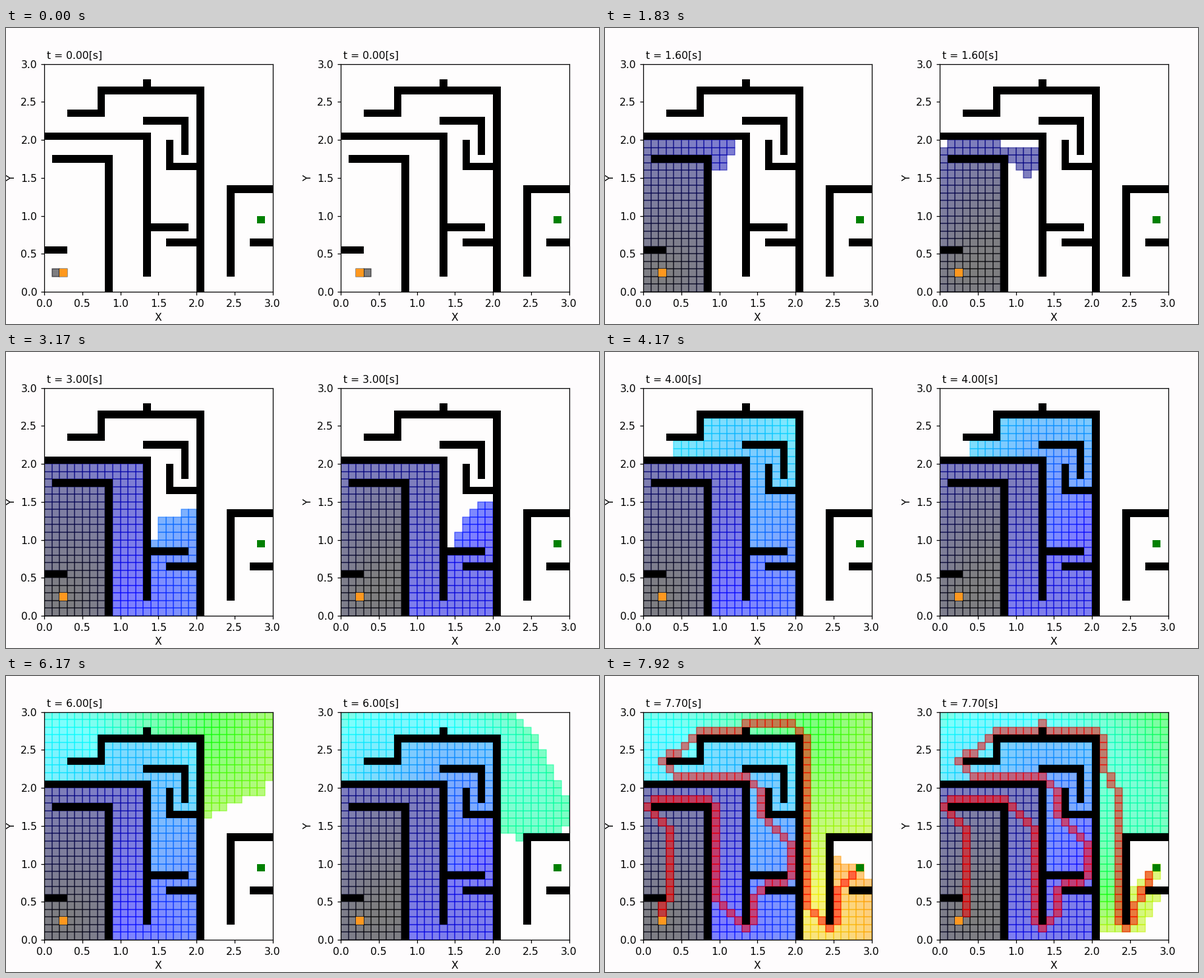
Write a matplotlib script that moves like this. It is 900 px wide and 450 px high and loops after 8000 ms.

```python
import math

import numpy as np
import matplotlib.pyplot as plt
from matplotlib.animation import FuncAnimation
from matplotlib.collections import PolyCollection
from matplotlib.colors import to_rgb
from matplotlib.patches import Rectangle

plt.rcParams["font.family"] = "DejaVu Sans"

SIZE = 30          # cells per side
CELL = 0.1
START, GOAL = (2, 2), (28, 9)
FRAMES, INTERVAL = 200, 40
PER_STEP = 10      # cells expanded per 0.1 s

# Each wall runs through these corner cells
WALLS = [
    [(0, 5), (2, 5)],
    [(8, 0), (8, 17), (1, 17)],
    [(0, 20), (13, 20), (13, 2)],
    [(20, 0), (20, 26), (7, 26), (7, 23), (3, 23)],
    [(13, 26), (13, 27)],
    [(13, 22), (18, 22), (18, 18)],
    [(16, 19), (16, 16), (20, 16)],
    [(13, 8), (18, 8)],
    [(16, 6), (20, 6)],
    [(24, 2), (24, 13), (29, 13)],
    [(27, 6), (29, 6)],
]
BARS = [(min(a, c), min(b, d), max(a, c), max(b, d))
        for wall in WALLS for (a, b), (c, d) in zip(wall, wall[1:])]
BLOCKED = {(x, y) for a, b, c, d in BARS
           for x in range(a, c + 1) for y in range(b, d + 1)}

MOVES = [(-1, 0), (0, 1), (1, 0), (0, -1), (-1, 1), (1, 1), (1, -1), (-1, -1)]

# Colour ramp over cost; each panel places the stops on its own scale
RAMP = np.array([to_rgb(c) for c in
                 ("black", "blue", "cyan", "lime", "#f0f000", "#ff9600")])


def search(weight):
    """Best-first search; return expanded cells, their costs and the route.

    A weight of zero ignores the distance to the goal.
    """
    def guess(cell):
        return weight * math.dist(cell, GOAL)

    queue, parent, closed, costs = {START: 0.0}, {}, [], []
    seen = set()
    while queue:
        cell = min(queue, key=lambda c: round(queue[c] + guess(c), 9))
        cost = queue.pop(cell)
        seen.add(cell)
        closed.append(cell)
        costs.append(cost + guess(cell) - guess(START))
        if cell == GOAL:
            break
        for dx, dy in MOVES:
            new = (cell[0] + dx, cell[1] + dy)
            if not (0 <= new[0] < SIZE and 0 <= new[1] < SIZE):
                continue
            if new in BLOCKED or new in seen:
                continue
            total = cost + math.hypot(dx, dy)
            if total < queue.get(new, math.inf) - 1e-9:
                queue[new] = total
                parent[new] = cell

    route = []
    cell = parent[GOAL]
    while cell != START:
        route.append(cell)
        cell = parent[cell]
    return closed, costs, route


def square(cell):
    x, y = cell[0] * CELL, cell[1] * CELL
    return [(x, y), (x + CELL, y), (x + CELL, y + CELL), (x, y + CELL)]


def bar(ax, x0, y0, x1, y1, color, z):
    ax.add_patch(Rectangle((x0 * CELL, y0 * CELL), (x1 - x0 + 1) * CELL,
                           (y1 - y0 + 1) * CELL, fc=color, lw=0, zorder=z))


class Panel:
    def __init__(self, fig, left, weight, stops):
        ax = fig.add_axes([left / 900, 49 / 450, 346.4 / 900, 346.4 / 450])
        ax.set_facecolor("#fefdfd")
        ax.set(xlim=(0, 3), ylim=(0, 3), xlabel="X", ylabel="Y")
        ticks = np.arange(0, 3.1, 0.5)
        ax.set_xticks(ticks)
        ax.set_yticks(ticks)

        closed, costs, route = search(weight)
        self.squares = [square(cell) for cell in closed]
        colors = np.column_stack(
            [np.interp(costs, stops, channel) for channel in RAMP.T]
            + [np.full(len(costs), 0.5)])
        self.cells = self.add_cells(ax, self.squares, colors, 1)
        self.route = self.add_cells(ax, [square(c) for c in route],
                                    [(1, 0, 0, 0.5)], 1.5)
        for ends in BARS:
            bar(ax, *ends, "black", 2)
        bar(ax, *START, *START, "#ff981e", 2.2)
        bar(ax, *GOAL, *GOAL, "green", 2.2)
        self.clock = ax.text(0.03, 3.068, "", fontsize=10)

    @staticmethod
    def add_cells(ax, squares, colors, z):
        cells = PolyCollection(squares, facecolors=colors, edgecolors=colors,
                               linewidths=1, zorder=z)
        ax.add_collection(cells, autolim=False)
        return cells

    def show(self, step):
        count = 2 + PER_STEP * step
        self.cells.set_verts(self.squares[:count])
        self.route.set_visible(count >= len(self.squares))
        self.clock.set_text(f"t = {step / 10:.2f}[s]")


fig = plt.figure(figsize=(8, 4), dpi=112.5, facecolor="#fefcfd")
panels = [Panel(fig, 58.1, 0, [0, 42, 87, 104, 125, 138]),
          Panel(fig, 508.1, 0.92, [0, 42, 93, 107, 117, 130])]


def update(frame):
    # Twelve ticks a second, five steps for every six ticks, a short wait first
    tick = (frame * INTERVAL + 35) * 12 // 1000
    step = max(0, (5 * tick + 2) // 6 - 2)
    for panel in panels:
        panel.show(step)
    return []


ani = FuncAnimation(fig, update, frames=FRAMES, interval=INTERVAL,
                    init_func=lambda: update(0), repeat=True, repeat_delay=0)
plt.show()
```
